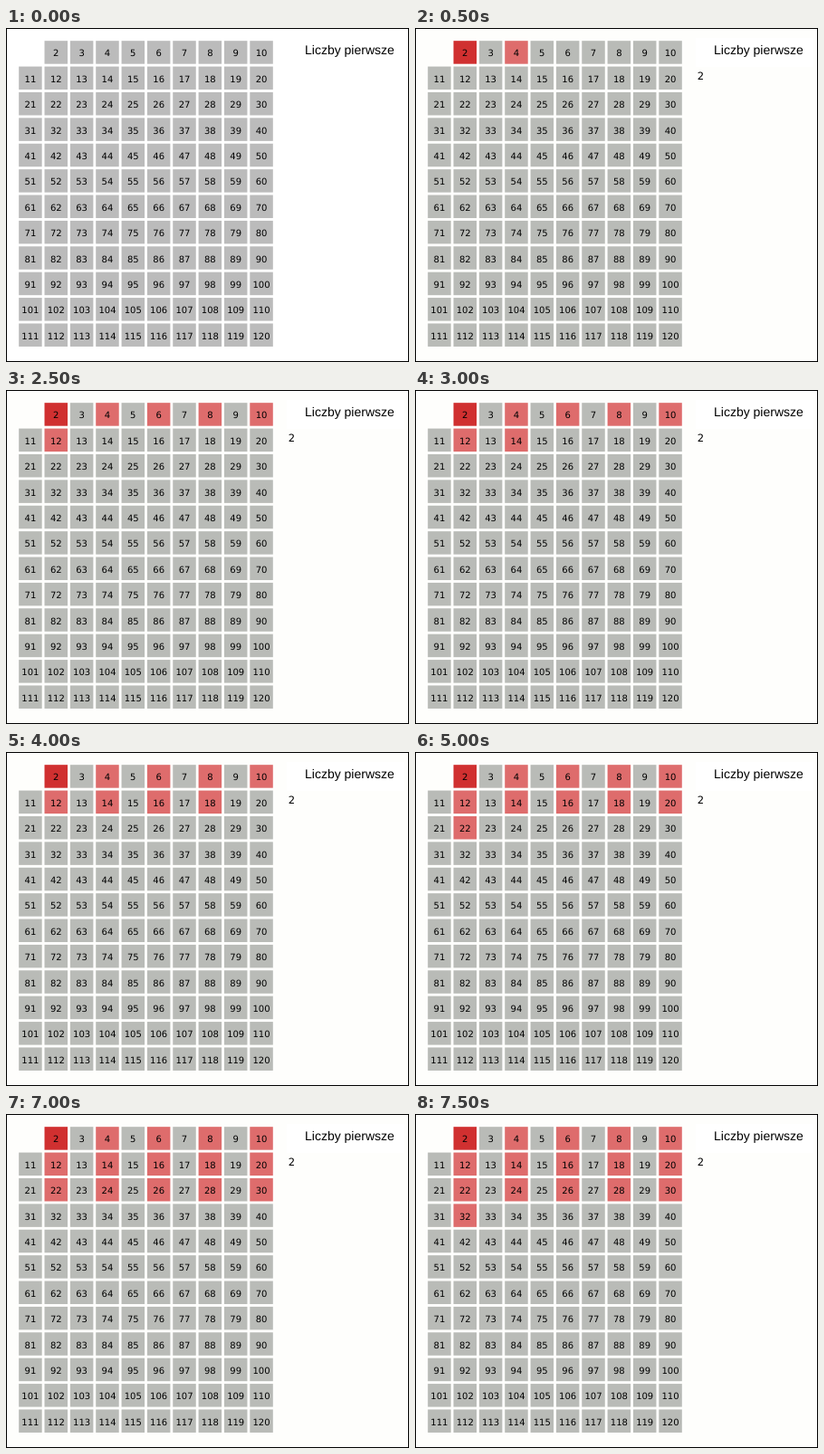
Recreate the animation shown at these times as an HTML page. Size 445x369 px, loop 8 s.

```html
<!DOCTYPE html>
<html lang="pl">
<head>
<meta charset="utf-8">
<title>Liczby pierwsze</title>
<style>
  html, body { margin: 0; width: 100%; height: 100%; overflow: hidden; background: #fff; }
  svg { display: block; }
  text { font-family: "DejaVu Sans", sans-serif; fill: #000; text-rendering: geometricPrecision; }
  .label { font-size: 10px; text-anchor: middle; }
  .title { font: 14px "Liberation Sans", Arial, sans-serif; }
  .found { font-size: 11.5px; }
</style>
</head>
<body>
<svg id="stage" width="445" height="369" viewBox="0 0 445 369">
  <rect id="page" x=".5" y=".5" width="444" height="368" stroke="#000"/>
  <rect x="310" y="11" width="130" height="32" fill="#fff"/>
  <text class="title" x="330" y="29">Liczby pierwsze</text>
  <text class="found" id="found" x="311.8" y="56.8">2</text>
</svg>
<script>
const LOOP = 8000, STEP = 500, LAST = 120;
const PITCH_X = 28.346, PITCH_Y = 28.39, ORIGIN = 14.17, SIZE = 25.5;
const START_GREY = "#bbbbbb", GREY = "#b9bbb7", PRIME = "#d03030", MULTIPLE = "#de6c6c";

const stage = document.getElementById("stage");
const page = document.getElementById("page");
const found = document.getElementById("found");
const cells = [];

function add(tag, attrs) {
  const node = document.createElementNS("http://www.w3.org/2000/svg", tag);
  for (const key in attrs) node.setAttribute(key, attrs[key]);
  return stage.appendChild(node);
}

for (let n = 2; n <= LAST; n++) {
  const x = ORIGIN + (n - 1) % 10 * PITCH_X;
  const y = ORIGIN + Math.floor((n - 1) / 10) * PITCH_Y;
  cells[n] = add("rect", { x, y, width: SIZE, height: SIZE });
  add("text", { class: "label", x: x + SIZE / 2, y: y + 17.3 }).textContent = n;
}

function cellColor(n, step) {
  if (step === 0) return START_GREY;
  if (n === 2) return PRIME;
  return n % 2 === 0 && n <= 2 + 2 * step ? MULTIPLE : GREY;
}

// Each step crosses out the next multiple of two.
function render(time) {
  const step = Math.floor(time % LOOP / STEP);
  page.setAttribute("fill", step ? "#fefefc" : "#fff");
  found.setAttribute("visibility", step ? "visible" : "hidden");
  cells.forEach((cell, n) => cell.setAttribute("fill", cellColor(n, step)));
}

const begin = performance.now();
function tick() {
  render(performance.now() - begin);
  requestAnimationFrame(tick);
}
tick();
</script>
</body>
</html>
```
